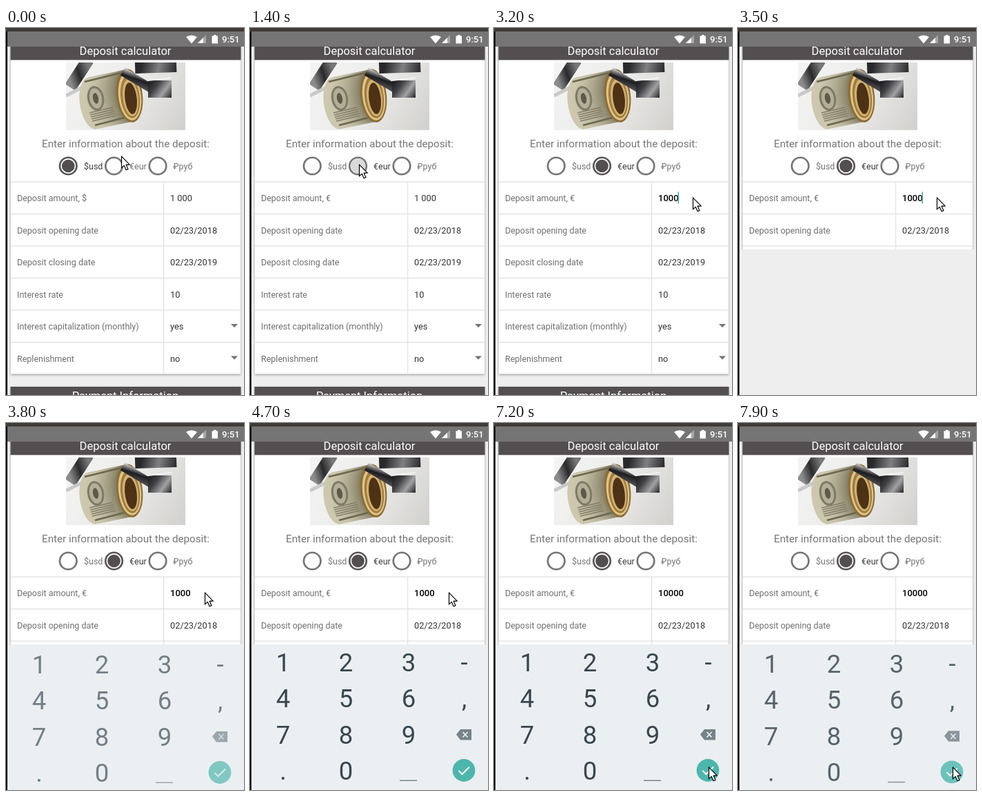
These frames come from a looping animation (345x532 px, 8 s). An HTML page with a canvas:

```html
<!DOCTYPE html>
<html lang="en">
<head>
<meta charset="utf-8">
<title>Deposit calculator</title>
<style>
html, body { margin: 0; width: 100%; height: 100%; overflow: hidden; background: #eee; }
canvas { display: block; width: 345px; height: 532px; }
</style>
</head>
<body>
<canvas id="stage"></canvas>
<script>
const W = 345, H = 532, LOOP = 8000, STEP = 100;
const DARK = '#534f50', GRAY = '#757575', LINE = '#dcdcdc', TEAL = '#4db6ac', INK = '#37474f';
const PANEL = '#ebeff2';
const PICK = 1000, SWITCH = 1200, CHECKED = 1500, FOCUS = 2800, EDIT = 3200;
const OPEN = 3500, TYPED = 6500, DONE = 7500;

const canvas = document.getElementById('stage');
const ctx = canvas.getContext('2d');
const dpr = window.devicePixelRatio || 1;
canvas.width = W * dpr;
canvas.height = H * dpr;

// Stops of the pointer; it passes outside the screen between 5.8 s and 6.1 s
const STOPS = [
  { t: 0, x: 167, y: 185 }, { t: 500, x: 158, y: 197 },
  { t: 1500, x: 158, y: 197 }, { t: 2000, x: 278, y: 244 },
  { t: 2500, x: 288, y: 245 }, { t: 5600, x: 288, y: 245 },
  { t: 5800, x: 378, y: 567 }, { t: 6100, x: 150, y: 540 },
  { t: 6400, x: 145, y: 507 }, { t: 6800, x: 145, y: 507 },
  { t: 7200, x: 311, y: 498 }, { t: LOOP, x: 311, y: 498 }
];

const clamp = v => Math.max(0, Math.min(1, v));
const mix = (a, b, k) => a + (b - a) * k;

function rect(x, y, w, h, color) {
  ctx.fillStyle = color;
  ctx.fillRect(x, y, w, h);
}

function poly(points, color) {
  ctx.beginPath();
  for (let i = 0; i < points.length; i += 2) ctx.lineTo(points[i], points[i + 1]);
  ctx.closePath();
  ctx.fillStyle = color;
  ctx.fill();
}

function line(width, color, ...points) {
  ctx.beginPath();
  ctx.moveTo(points[0], points[1]);
  for (let i = 2; i < points.length; i += 2) ctx.lineTo(points[i], points[i + 1]);
  ctx.lineWidth = width;
  ctx.strokeStyle = color;
  ctx.stroke();
}

function oval(x, y, rx, ry, color, tilt = 0) {
  ctx.beginPath();
  ctx.ellipse(x, y, rx, ry, tilt, 0, 7);
  ctx.fillStyle = color;
  ctx.fill();
}

const disc = (x, y, r, color) => oval(x, y, r, r, color);

function text(str, x, y, size, color, align = 'left', weight = 400) {
  ctx.font = `${weight} ${size}px Roboto, sans-serif`;
  ctx.textAlign = align;
  ctx.fillStyle = color;
  ctx.fillText(str, x, y);
}

function gradient(x0, y0, x1, y1, ...colors) {
  const g = ctx.createLinearGradient(x0, y0, x1, y1);
  colors.forEach((c, i) => g.addColorStop(i / (colors.length - 1), c));
  return g;
}

// Rolled note held by a chrome clamp
function photo() {
  ctx.save();
  ctx.translate(87, 50);
  ctx.beginPath();
  ctx.rect(0, 0, 173, 98);
  ctx.clip();
  rect(0, 0, 173, 98, gradient(0, 0, 173, 98, '#f4f4f4', '#ececea', '#d2d0cd'));

  line(18, gradient(0, 10, 30, 0, '#8c8c8e', '#2a292c', '#777'), 6, 36, 32, -4);
  line(5, '#c9c9c9', 0, 48, 24, 36);
  line(24, gradient(110, 0, 160, 10, '#29282a', '#808083', '#2c2b2e'), 100, 4, 160, 2);

  // body swept from the left edge to the open end
  const sweep = 24;
  for (let i = 0; i <= sweep; i++) {
    const k = i / sweep, shade = 205 - 75 * k * k;
    oval(mix(38, 91, k), mix(59, 48, k), 18, 38, `rgb(${shade},${shade - 5},${shade - 31})`, -0.15);
  }
  line(2.5, '#6b674f', 27, 28, 80, 15);
  line(2.5, '#6b674f', 42, 91, 92, 78);
  oval(43, 52, 12, 18, '#7d7a66', -0.2);
  oval(43, 52, 9, 15, '#b3ae96', -0.2);
  oval(43, 52, 4, 8, '#5d5a4a', -0.2);
  for (let i = 0; i < 5; i++) line(1.5, '#827d66', 34 + i, 73 + i * 3, 68 + i, 65 + i * 3);

  ['#8d6d35', '#dfc58c', '#a17c3d', '#d2b271', '#4d3216'].forEach((color, i) => {
    oval(92 + i * 0.5, 48 + i, 19 - i * 2.6, 39 - i * 4, color, -0.12);
  });

  // arm across the roll
  line(13, gradient(90, 10, 84, 28, '#cfcfcf', '#1c1b1e', '#4b4a4d'), 82, 13, 124, 38);
  rect(119, 26, 34, 25, gradient(119, 26, 153, 51, '#18171a', '#414044', '#a2a2a4', '#242326'));
  line(2, '#f2f2f2', 119, 26, 153, 22);
  ctx.restore();
}

function statusBar() {
  rect(0, 0, W, 5, '#3f3b36');
  rect(2, 5, W - 2, 22, GRAY);
  ctx.beginPath();
  ctx.moveTo(269, 22.5);
  ctx.lineTo(261, 13);
  ctx.quadraticCurveTo(269, 7.8, 277, 13);
  ctx.fillStyle = '#fff';
  ctx.fill();
  poly([278, 22, 290, 10, 290, 22], '#a6a6a6');
  poly([278, 22, 286, 14, 286, 22], '#fff');
  rect(298.5, 11.5, 8.5, 11, '#fff');
  rect(301, 10, 3.5, 2, '#fff');
  text('9:51', 313, 21, 13, '#fff', 'left', 500);
}

function radio(x, label, labelX, { dot = false, press = 0, active = false }) {
  const y = 200;
  disc(x, y, 13.6, dot ? '#5a5657' : GRAY);
  disc(x, y, 10.9, '#fff');
  if (press) disc(x, y, 10.9 * press, '#dadada');
  if (dot) disc(x, y, 9.3, DARK);
  text(label, labelX, 205, 12.5, active ? '#3c3c3c' : GRAY);
}

function card(y, h, title, titleY, barY, barH) {
  ctx.save();
  ctx.shadowColor = 'rgba(0,0,0,.32)';
  ctx.shadowBlur = 3 * dpr;
  ctx.shadowOffsetY = dpr;
  rect(7, y, 333, h, '#fff');
  ctx.restore();
  rect(6.5, barY, 334, barH, DARK);
  text(title, 173, titleY, 16.5, '#fff', 'center');
}

// The blink restarts with every edit
function caretOn(t) {
  if (t < FOCUS || t >= DONE) return false;
  const since = t >= TYPED ? TYPED : t >= EDIT ? EDIT : FOCUS;
  return Math.floor((t - since) / 500) % 2 === 0;
}

function form(t) {
  const euro = t >= SWITCH, focused = t >= EDIT;
  card(20, 481.5, 'Deposit calculator', 39.3, 26, 20.4);
  photo();
  text('Enter information about the deposit:', 173.5, 173.4, 15.2, GRAY, 'center');

  const press = t >= PICK && t < CHECKED ? clamp((t - PICK + 200) / 400) : 0;
  radio(90.2, '$usd', 113, { dot: !euro, active: !euro });
  radio(156.5, '€eur', 179, { dot: t >= CHECKED, press, active: euro });
  radio(220, '₽руб', 242.3, {});

  const amount = t >= TYPED ? '10000' : focused ? '1000' : '1 000';
  const rows = [
    ['Deposit amount, ' + (euro ? '€' : '$'), amount],
    ['Deposit opening date', '02/23/2018'],
    ['Deposit closing date', '02/23/2019'],
    ['Interest rate', '10'],
    ['Interest capitalization (monthly)', 'yes'],
    ['Replenishment', 'no']
  ];
  rows.forEach(([label, value], i) => {
    const y = 222.5 + i * 46.5, base = y + 28.7;
    rect(7, y, 333, 1.1, LINE);
    text(label, 16, base, 12.5, '#6f6f6f');
    if (focused && i === 0) text(value, 238, base, 13, '#000', 'left', 500);
    else text(value, 238, base, 12.8, '#333');
    if (i > 3) poly([326, y + 20.5, 336, y + 20.5, 331, y + 25.7], GRAY);
  });
  rect(228.2, 223, 1, 278, LINE);

  if (caretOn(t)) rect(t >= TYPED ? 274.5 : focused ? 266.5 : 269.5, 237.5, 1.5, 17, '#3fa79c');

  card(520, 40, 'Payment Information', 539, 520, 12);
}

function keyboard(t) {
  if (t < OPEN) return;
  const show = clamp((t - OPEN - 100) / 300), hide = clamp((t - DONE - 100) / 300);
  rect(2, 321, W - 2, H - 321, show ? PANEL : '#eee');
  ctx.save();
  ctx.globalAlpha = show * (1 - 0.17 * hide);
  ctx.translate(0, 9 * (1 - show) + 2.3 * hide);

  ['123-', '456,', '789', '.0'].forEach((row, r) => {
    [...row].forEach((key, c) => {
      text(key, Math.min(48 + 91 * c, 310.5), 359.7 + r * 52.4, 36.5, INK, 'center');
    });
  });
  rect(217, 517.6, 25, 1.4, '#6f7d84');

  poly([299, 451.5, 305, 444, 321, 444, 321, 459.5, 305, 459.5], '#75838a');
  line(1.8, PANEL, 308.5, 448, 315.5, 455.5);
  line(1.8, PANEL, 315.5, 448, 308.5, 455.5);

  disc(310, 503.5, 16.4, t > DONE ? '#53bab0' : TEAL);
  line(2, '#fff', 302.5, 504, 307.5, 509, 318, 498.5);
  ctx.restore();
}

function pointer(t) {
  const i = Math.max(1, STOPS.findIndex(s => s.t >= t));
  const a = STOPS[i - 1], b = STOPS[i];
  const k = ((t - a.t) / (b.t - a.t)) ** 1.2;
  ctx.save();
  ctx.translate(mix(a.x, b.x, k) + 0.5, mix(a.y, b.y, k) + 1.2);
  poly([0, 0, 0, 16.5, 3.8, 13.2, 6.6, 19.6, 9.4, 18.4, 6.7, 12.1, 11.6, 11.7], '#fff');
  ctx.lineWidth = 1.2;
  ctx.strokeStyle = '#000';
  ctx.stroke();
  ctx.restore();
}

function draw(now) {
  const t = Math.floor((now % LOOP) / STEP) * STEP;
  ctx.setTransform(dpr, 0, 0, dpr, 0, 0);
  rect(0, 0, W, H, '#eee');
  form(t);
  keyboard(t);
  statusBar();
  rect(0, 5, 2, H - 5, '#000');
  pointer(t);
}

let start;
function frame(now) {
  start ??= now;
  draw(Math.max(0, now - start));
  requestAnimationFrame(frame);
}
requestAnimationFrame(frame);
</script>
</body>
</html>
```
